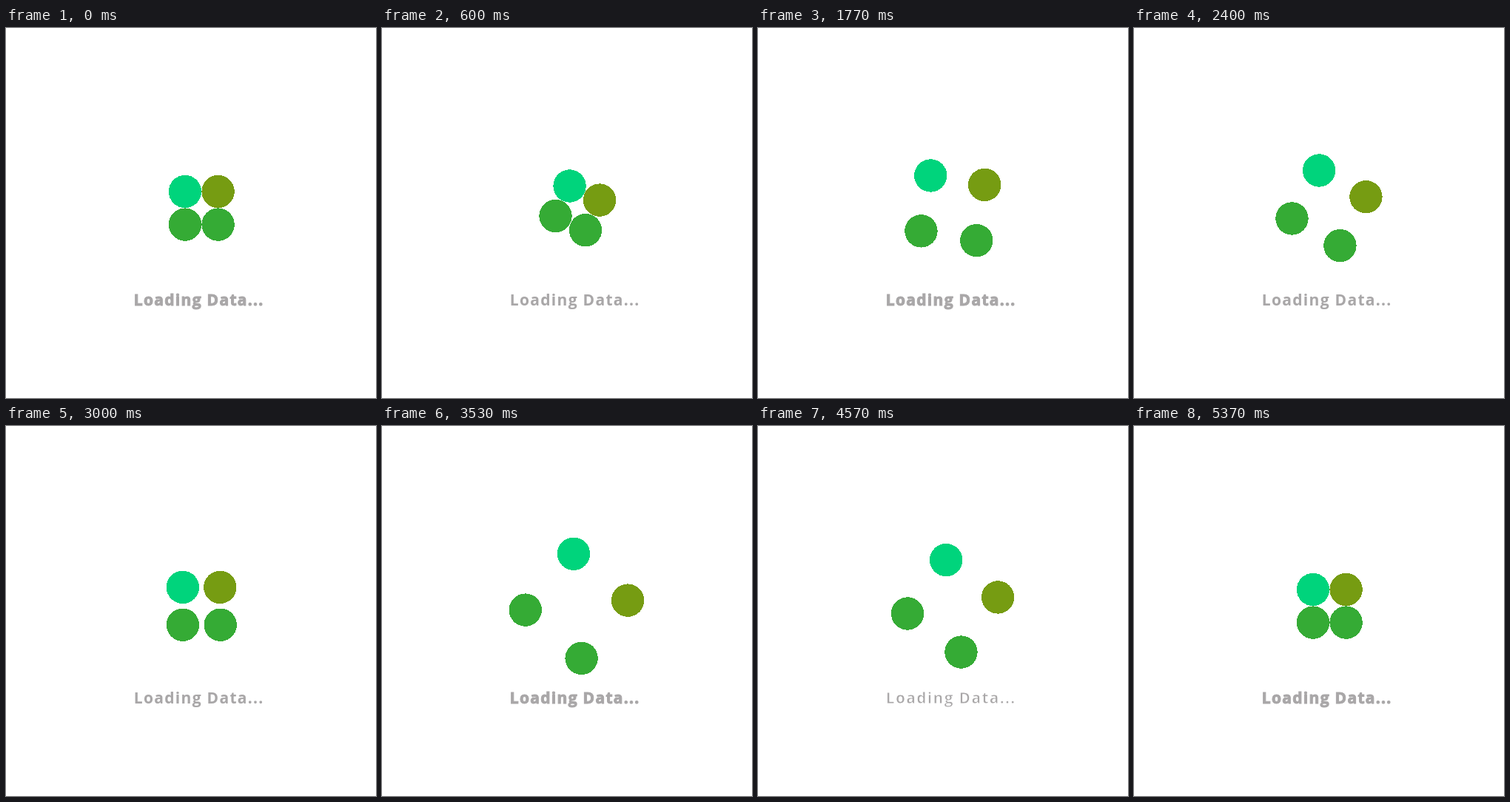
Animation of 500x500 px, one loop 5410 ms. Source, as an HTML page:

```html
<!DOCTYPE html>
<html lang="en">
<head>
<meta charset="utf-8">
<title>Loading</title>
<style>
  html, body { margin: 0; width: 100%; height: 100%; overflow: hidden; background: #fff; }
  svg { display: block; width: 100%; height: 100%; }
  circle { shape-rendering: crispEdges; }
  text { font: 700 21px "Open Sans", "Noto Sans", sans-serif; letter-spacing: 1.3px; fill: #a9a7a8; }
</style>
</head>
<body>
<svg viewBox="0 0 500 500">
  <text x="172.8" y="375">Loading Data...</text>
  <g id="dots"></g>
</svg>
<script>
const LOOP = 5410, FRAMES = 162, BEAT = 32, TEXT_BEAT = 54;
const CX = 264.3, CY = 243.3, REST = 22.3, REACH = 30;

// Side signs, colour and horizontal reach of each dot
const dots = [
  [-1, -1, '#00d47c', 1],
  [1, -1, '#769c12', 0.87],
  [-1, 1, '#35ab35', 1],
  [1, 1, '#35ab35', 1]
].map(([sx, sy, fill, reachX]) => {
  const el = document.createElementNS('http://www.w3.org/2000/svg', 'circle');
  el.setAttribute('r', 22.2);
  el.setAttribute('fill', fill);
  document.getElementById('dots').append(el);
  return { el, sx, sy, reachX };
});
const label = document.querySelector('text');

const clamp = x => Math.min(1, Math.max(0, x));
const ease = (t, from, to) => (1 - Math.cos(Math.PI * clamp((t - from) / (to - from)))) / 2;
const pulse = (t, mid, half) => Math.abs(t - mid) < half ? Math.cos((t - mid) / half * Math.PI / 2) ** 2 : 0;

function draw(ms) {
  const frame = Math.floor((ms % LOOP) / LOOP * FRAMES + 0.3) % FRAMES;
  const t = frame % BEAT;

  // A large burst, then a smaller one while the group turns back
  const spread = REACH * (pulse(t, 11.1, 6.2) + 0.68 * pulse(t, 22.5, 4.7));
  const angle = Math.PI / 4 * (ease(t, 2, 12) - ease(t, 12, 25));
  const cos = Math.cos(angle), sin = Math.sin(angle);
  for (const { el, sx, sy, reachX } of dots) {
    const x = sx * (REST + spread * reachX), y = sy * (REST + spread);
    el.setAttribute('cx', CX + x * cos - y * sin);
    el.setAttribute('cy', CY + x * sin + y * cos);
  }

  // A grey outline thickens the letters, a white one thins them
  const weight = clamp(1 + Math.cos(frame / TEXT_BEAT * 2 * Math.PI));
  const outline = 1.9 * weight - 0.9;
  label.setAttribute('stroke', outline > 0 ? '#a9a7a8' : '#fff');
  label.setAttribute('stroke-width', Math.abs(outline));
}

const start = performance.now();
function tick() {
  draw(performance.now() - start);
  requestAnimationFrame(tick);
}
tick();
</script>
</body>
</html>
```
